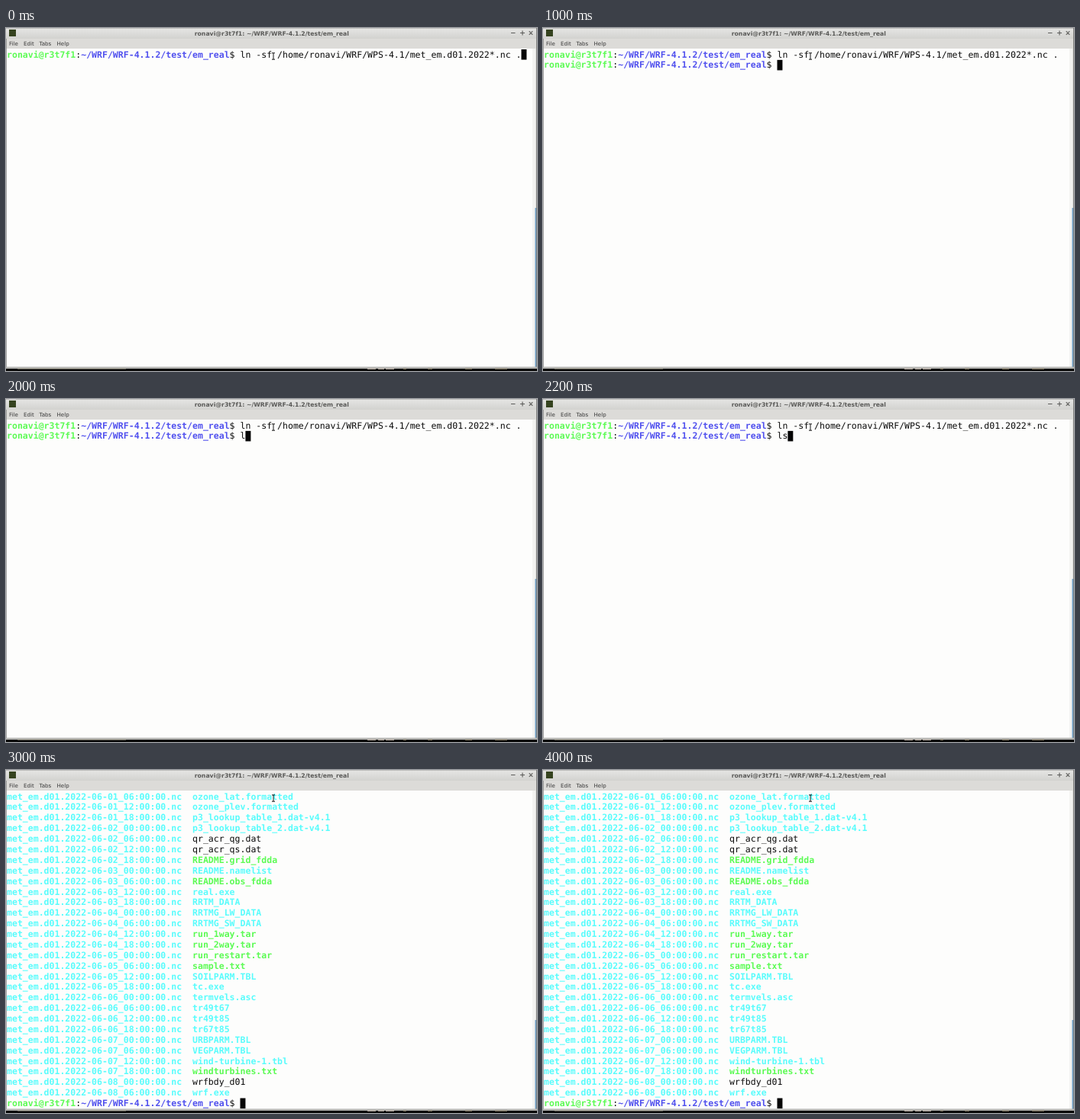
Recreate the animation shown at these times as an HTML page with a canvas. Size 695 by 450 pixels, loop 4.2 s.

```html
<!DOCTYPE html>
<html lang="en">
<head>
<meta charset="utf-8">
<title>Terminal</title>
<style>
  html, body { margin: 0; width: 100%; height: 100%; overflow: hidden; background: #fdfdfc; }
  canvas { display: block; }
</style>
</head>
<body>
<canvas id="stage" width="695" height="450"></canvas>
<script>
const ctx = document.getElementById('stage').getContext('2d');
const W = 695, H = 450, LOOP = 4200;
const LEFT = 1, TOP = 28, CELL = 6.943, ROW = 13.88;
const MONO = '11.53px "DejaVu Sans Mono", monospace';
const SANS = '"DejaVu Sans", sans-serif';
const INK = '#0a0a0a', CYAN = '#58fcfc', GREEN = '#5cfb54', BLUE = '#5050ee';

const USER = 'ronavi', HOST = 'r3t7f1', DIR = '~/WRF/WRF-4.1.2/test/em_real';
const LINK = `ln -sf /home/${USER}/WRF/WPS-4.1/met_em.d01.2022*.nc .`;

// A leading "+" marks a green entry, "-" a plain one; the rest are links.
const FILES = `ozone_lat.formatted ozone_plev.formatted p3_lookup_table_1.dat-v4.1
  p3_lookup_table_2.dat-v4.1 -qr_acr_qg.dat -qr_acr_qs.dat +README.grid_fdda
  README.namelist +README.obs_fdda real.exe RRTM_DATA RRTMG_LW_DATA RRTMG_SW_DATA
  +run_1way.tar +run_2way.tar +run_restart.tar +sample.txt SOILPARM.TBL tc.exe
  termvels.asc tr49t67 tr49t85 tr67t85 URBPARM.TBL VEGPARM.TBL wind-turbine-1.tbl
  +windturbines.txt -wrfbdy_d01 wrf.exe`.split(/\s+/);

function rect(x, y, w, h, color) {
  ctx.fillStyle = color;
  ctx.fillRect(x, y, w, h);
}

function label(text, x, y, font, color, align = 'left') {
  ctx.font = font;
  ctx.fillStyle = color;
  ctx.textAlign = align;
  ctx.fillText(text, x, y);
}

function line(color, width, ...points) {
  ctx.strokeStyle = color;
  ctx.lineWidth = width;
  ctx.beginPath();
  for (const [x1, y1, x2, y2] of points) {
    ctx.moveTo(x1, y1);
    ctx.lineTo(x2, y2);
  }
  ctx.stroke();
}

// Writes on the character grid and returns the next column.
function write(text, col, row, color, bold = true) {
  ctx.font = (bold ? 'bold ' : '') + MONO;
  ctx.fillStyle = color;
  ctx.textAlign = 'left';
  const y = TOP + row * ROW + 10.6;
  for (const ch of text) ctx.fillText(ch, LEFT + CELL * col++, y);
  return col;
}

function prompt(row, command, active) {
  let col = write(`${USER}@${HOST}`, 0, row, GREEN);
  col = write(':', col, row, INK, false);
  col = write(DIR, col, row, BLUE);
  col = write('$ ' + command, col, row, INK, false);
  if (active) rect(LEFT + col * CELL, TOP + row * ROW, CELL, ROW - 0.3, '#050505');
}

function listing() {
  const pad = n => String(n).padStart(2, '0');
  FILES.forEach((file, row) => {
    const hours = 6 * (row + 1);
    const day = pad(1 + Math.floor(hours / 24));
    write(`met_em.d01.2022-06-${day}_${pad(hours % 24)}:00:00.nc`, 0, row, CYAN);
    const plain = file[0] === '-', green = file[0] === '+';
    const name = plain || green ? file.slice(1) : file;
    write(name, 35, row, plain ? INK : green ? GREEN : CYAN, !plain);
  });
  prompt(FILES.length, '', true);
}

function chrome(thumbTop) {
  const bar = ctx.createLinearGradient(0, 0, 0, 14);
  bar.addColorStop(0, '#e6e6e4');
  bar.addColorStop(1, '#d2d2cf');
  rect(0, 0, W, 14, bar);
  rect(0, 14, W, 13, '#dcdbd8');
  rect(0, 0, W, 0.6, '#a5a5a3');
  rect(4, 2, 9, 9, '#35431f');
  label(`${USER}@${HOST}: ${DIR}`, 347.8, 9.6, 'bold 7.75px ' + SANS, '#5a5a58', 'center');
  [['File', 4], ['Edit', 23], ['Tabs', 43.5], ['Help', 66.5]]
    .forEach(([text, x]) => label(text, x, 23.2, '7.1px ' + SANS, '#383838'));

  line('#5c5c5a', 1.1,
    [661, 6.5, 666.5, 6.5],
    [673, 6.5, 679, 6.5], [676, 3.5, 676, 9.5],
    [684.7, 4.2, 689.3, 8.8], [689.3, 4.2, 684.7, 8.8]);

  rect(689, 27, 4, 418, '#f3f3f1');
  rect(693, 27, 1, 418, '#dededc');
  rect(692.5, thumbTop, 1.7, 445 - thumbTop, '#6c9cc4');
  rect(0, 14, 0.8, 432, '#8e8e8c');
  rect(694.2, 0, 0.8, 446, '#6a6a68');

  rect(0, 444.5, W, 2.5, '#b4b4b1');
  rect(0, 447, W, H - 447, '#060606');
  rect(15, 446.5, 142, 0.9, '#bdb9a6');
  [[473, 11], [487, 8], [497, 11], [520, 4], [552, 6], [601, 9], [640, 16]]
    .forEach(([x, w], i) => rect(x, 446.6, w, 1.2, i < 3 ? '#cfc4b8' : '#8a8069'));
}

function pointer() {
  line('#161616', 1,
    [350, 33, 350, 41],
    [348, 32.8, 352, 32.8], [348, 41.2, 352, 41.2]);
}

function draw(t) {
  rect(0, 0, W, H, '#fdfdfc');
  const listed = t >= 2400;
  chrome(listed ? 328 : 236);
  if (listed) {
    listing();
  } else {
    const entered = t >= 1000;
    prompt(0, LINK, !entered);
    const typed = t >= 2200 ? 2 : t >= 2000 ? 1 : 0;
    if (entered) prompt(1, 'ls'.slice(0, typed), true);
  }
  pointer();
}

ctx.textRendering = 'geometricPrecision';
const start = performance.now();
function tick() {
  draw((performance.now() - start) % LOOP);
  requestAnimationFrame(tick);
}
tick();
</script>
</body>
</html>
```
